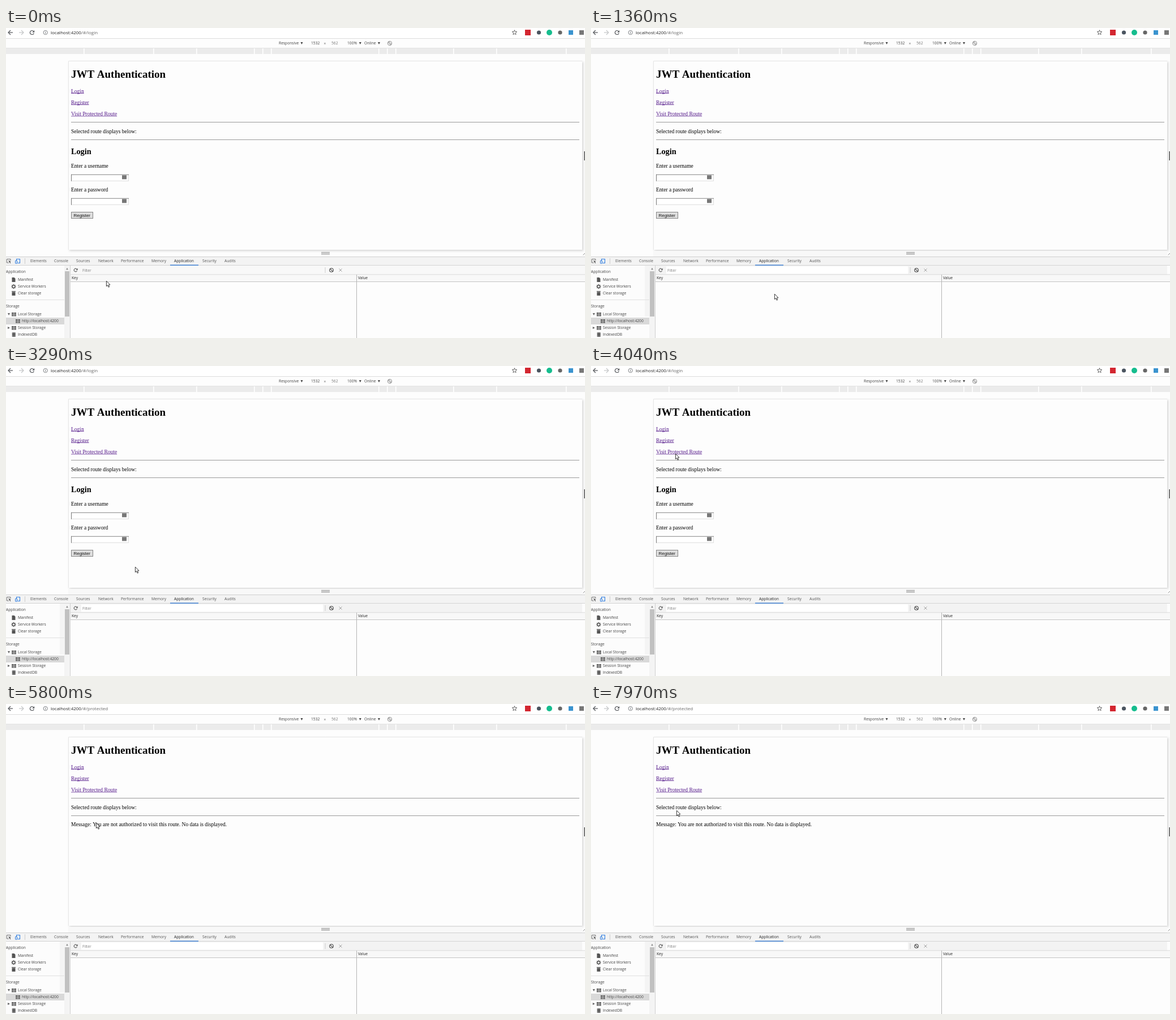
Animation of 1023x548 px, one loop 8000 ms. Source, as an HTML page with a canvas:

```html
<!DOCTYPE html>
<html lang="en">
<head>
<meta charset="utf-8">
<title>JWT Authentication</title>
<style>
html, body { margin: 0; width: 100%; height: 100%; overflow: hidden; background: #fdfdfd; }
canvas { display: block; width: 1023px; height: 548px; }
</style>
</head>
<body>
<canvas id="stage"></canvas>
<script>
const W = 1023, H = 548, LOOP = 8000, STEP = 120;
const canvas = document.getElementById('stage');
const ratio = window.devicePixelRatio || 1;
canvas.width = W * ratio;
canvas.height = H * ratio;
const ctx = canvas.getContext('2d');

const UI = '"Open Sans", "Noto Sans", sans-serif';
const SERIF = '"Liberation Serif", "Times New Roman", serif';
const ARIAL = '"Liberation Sans", Arial, sans-serif';
const UI_SIZE = 6.7;
const BODY = 9.49;

// start time, x and y of the pointer tip, number of even steps to get there
const MOVES = [
  [0, 177, 447], [280, 192, 438, 2], [550, 157, 405], [700, 123, 400],
  [820, 96, 428], [970, 219, 498, 3], [1360, 324, 470], [1480, 328, 442],
  [1630, 248, 410], [1750, 164, 425], [1900, 135, 462], [2020, 153, 492],
  [2170, 243, 505], [2320, 284, 486], [3020, 256, 423, 2], [3290, 228, 355],
  [3410, 210, 308, 2], [3680, 149, 155, 4], [4190, 147, 153], [4890, 165, 233, 2],
  [5160, 166, 235], [5410, 160, 211, 3], [5800, 159, 210], [6080, 254, 213, 4],
  [6590, 384, 213, 3], [6960, 391, 213], [7080, 225, 212, 3], [7460, 152, 211, 4],
  [7970, 151, 188]
];

function pointerAt(t) {
  const i = MOVES.filter(m => m[0] <= t).length - 1;
  const [start, x, y, steps = 1] = MOVES[i];
  const [, fromX, fromY] = MOVES[Math.max(0, i - 1)];
  const k = Math.min(1, (Math.floor((t - start) / STEP) + 1) / steps);
  return [Math.round(fromX + (x - fromX) * k), Math.round(fromY + (y - fromY) * k)];
}

function rect(x, y, w, h, color) {
  ctx.fillStyle = color;
  ctx.fillRect(x, y, w, h);
}

function line(points, color, width = 1, closed = false) {
  ctx.beginPath();
  points.forEach(([x, y], i) => i ? ctx.lineTo(x, y) : ctx.moveTo(x, y));
  if (closed) ctx.closePath();
  ctx.strokeStyle = color;
  ctx.lineWidth = width;
  ctx.stroke();
}

function shape(points, color) {
  ctx.beginPath();
  points.forEach(([x, y]) => ctx.lineTo(x, y));
  ctx.closePath();
  ctx.fillStyle = color;
  ctx.fill();
}

function dot(x, y, r, color) {
  ctx.beginPath();
  ctx.arc(x, y, r, 0, Math.PI * 2);
  ctx.fillStyle = color;
  ctx.fill();
}

function ring(x, y, r, color, width = 1, from = 0, to = Math.PI * 2) {
  ctx.beginPath();
  ctx.arc(x, y, r, from, to);
  ctx.strokeStyle = color;
  ctx.lineWidth = width;
  ctx.stroke();
}

function text(str, x, y, size, family, color = '#000', weight = '') {
  ctx.font = `${weight} ${size}px ${family}`;
  ctx.fillStyle = color;
  ctx.fillText(str, x, y);
  return ctx.measureText(str).width;
}

// label placed by the middle of its line
function label(str, x, mid, color = '#444', size = UI_SIZE) {
  return text(str, x, mid + size * 0.36, size, UI, color);
}

function serif(str, y, color = '#000') {
  return text(str, 115, y, BODY, SERIF, color);
}

function link(str, y, color = '#551a8b') {
  const w = serif(str, y, color);
  rect(115, y + 0.8, w, 0.7, color);
}

function triangle(x, y, r, color, dir) {
  shape(dir === 'right'
    ? [[x - r, y - r], [x + r, y], [x - r, y + r]]
    : [[x - r, y - r * dir], [x + r, y - r * dir], [x, y + r * dir]], color);
}

function reload(x, y, r, color, width) {
  ring(x, y, r, color, width, 0.35, 5.5);
  shape([[x + r + 0.7, y - r - 0.4], [x + r + 0.7, y - 0.3], [x + 0.4, y - 0.3]], color);
}

function arrow(x, y, dir, color) {
  line([[x - 4 * dir, y], [x + 4 * dir, y]], color, 1.2);
  line([[x, y - 4], [x + 4 * dir, y], [x, y + 4]], color, 1.2);
}

function star(x, y, r) {
  const pts = [];
  for (let i = 0; i < 10; i++) {
    const a = -Math.PI / 2 + i * Math.PI / 5, k = i % 2 ? r * 0.45 : r;
    pts.push([x + k * Math.cos(a), y + k * Math.sin(a)]);
  }
  line(pts, '#555', 0.9, true);
}

function addressBar(path) {
  rect(0, 0, W, 18, '#fff');
  arrow(8, 8, -1, '#505357');
  arrow(27, 8, 1, '#c3c5c7');
  reload(46, 8, 3.5, '#505357', 1.2);
  ring(69.7, 8, 3.6, '#5f6368', 0.8);
  rect(69.3, 7.3, 0.9, 2.7, '#5f6368');
  rect(69.3, 5.7, 0.9, 0.9, '#5f6368');
  const w = label('localhost:4200', 79, 8, '#222', 8);
  label(path, 79 + w, 8, '#666', 8);
  star(898.5, 8, 4.4);
  rect(917, 3, 10, 10, '#d32630');
  dot(941.5, 8, 3.6, '#4b5560');
  dot(960, 8, 5, '#16bd8e');
  dot(979, 8, 3.6, '#666');
  rect(994, 4, 8, 8, '#3a93cf');
  rect(1013, 4, 8, 8, '#777');
  rect(0, 18, W, 1, '#dcdcdc');
}

function deviceBar() {
  rect(0, 19, W, 17, '#fdfdfd');
  label('Responsive', 482, 27);
  triangle(522.5, 27, 2, '#444', 1);
  label('1532', 539, 27);
  label('×', 561.5, 28, '#666');
  label('562', 575, 27, '#777');
  label('100%', 603, 27);
  triangle(625.8, 27, 2, '#444', 1);
  label('Online', 633, 27);
  triangle(659, 27, 2, '#444', 1);
  ring(678, 27, 3.7, '#777', 0.8);
  line([[675.6, 25.5], [677, 24.4], [680.4, 28.4], [679, 29.6]], '#666', 0.8, true);
  rect(0, 35, W, 1, '#e3e3e3');
  rect(0, 36, W, 10, '#ebebeb');
  // breakpoint marks mirror around the centre
  for (const d of [95, 110, 125, 227, 303, 426]) {
    for (const x of [564 - d, 564 + d]) rect(x - 1, 36, 1.6, 10, '#fff');
  }
}

function input(y) {
  rect(115, y, 102, 12, '#dedede');
  rect(115, y, 102, 1, '#777');
  rect(115, y, 1, 12, '#777');
  rect(116, y + 1, 100, 10, '#fff');
  rect(205, y + 1.5, 8, 7, '#777');
}

function loginForm() {
  text('Login', 115, 223, 14.23, SERIF, '#000', 'bold');
  serif('Enter a username', 246.8);
  input(258.8);
  serif('Enter a password', 288.8);
  input(300.8);
  rect(115, 325, 39, 12, '#858585');
  rect(116, 326, 37, 10, '#dedede');
  text('Register', 119.6, 333.8, 7.9, ARIAL, '#111');
}

function page(t) {
  ctx.save();
  ctx.shadowColor = 'rgba(0,0,0,0.16)';
  ctx.shadowBlur = 4 * ratio;
  ctx.shadowOffsetX = ctx.shadowOffsetY = 1.5 * ratio;
  rect(110, 58, 908, 334, '#fdfdfd');
  ctx.restore();
  line([[110.5, 392], [110.5, 58.5], [1018, 58.5]], '#e6e6e6');

  text('JWT Authentication', 115, 88.4, 18.98, SERIF, '#000', 'bold');
  link('Login', 114.5);
  link('Register', 134.6);
  const pressed = t >= 4590 && t < 4740;
  if (pressed) rect(115, 146, 81, 11, '#add8e6');
  link('Visit Protected Route', 154.8, pressed ? '#b0507e' : undefined);
  rect(115, 166, 898, 1, '#9a9a9a');
  serif('Selected route displays below:', 185.6);
  rect(115, 197, 898, 1, '#9a9a9a');
  if (t < 4590) loginForm();
  else serif('Message: You are not authorized to visit this route. No data is displayed.', 216.3);
}

function resizers(t) {
  if (isResizing(t)) rect(110, 392, 908, 12, '#d5d5d5');
  else if (t >= 820) rect(110, 394, 908, 10, '#f8f8f8');
  rect(557, 396.3, 15, 1, '#777');
  rect(557, 399, 15, 1, '#777');
  rect(1021.5, 218, 1.5, 16, '#555');
  line([[1019.5, 401.5], [1023, 398]], '#777', 0.8);
}

function tabs() {
  rect(0, 404, W, 16, '#f3f3f3');
  rect(0, 404, W, 1, '#d0d0d0');
  line([[5, 415], [1.5, 415], [1.5, 408.5], [8, 408.5], [8, 411]], '#666', 0.9);
  shape([[4, 410.5], [9, 412.8], [6.9, 413.5], [8.5, 415.5], [7.5, 416], [6, 414.2]], '#555');
  line([[18.5, 408.5], [24.5, 408.5], [24.5, 415.5], [18.5, 415.5]], '#2f7de1', 1.1, true);
  rect(16, 411, 4.5, 6, '#f3f3f3');
  line([[16.6, 411.5], [19.6, 411.5], [19.6, 416], [16.6, 416]], '#2f7de1', 1, true);
  rect(33, 407, 1, 10, '#ccc');
  const names = { Elements: 43, Console: 85, Sources: 124, Network: 163, Performance: 203,
    Memory: 257, Application: 297, Security: 347, Audits: 386 };
  for (const name in names) label(name, names[name], 412, name === 'Application' ? '#222' : '#555');
  rect(0, 419, W, 1, '#d4d4d4');
  rect(290, 418.5, 50, 1.5, '#3f7fd0');
}

function grid(x, y) {
  rect(x, y - 3, 8, 6.4, '#555');
  for (const dy of [-1.2, 0.9]) rect(x, y + dy, 8, 0.6, '#eee');
  rect(x + 3.7, y - 3, 0.6, 6.4, '#eee');
}

function gear(x, y) {
  ring(x, y, 2.4, '#555', 1.5);
  for (let i = 0; i < 8; i++) {
    const a = i * Math.PI / 4, c = Math.cos(a), s = Math.sin(a);
    line([[x + 3 * c, y + 3 * s], [x + 4.2 * c, y + 4.2 * s]], '#555', 1.1);
  }
}

function sidebar(t) {
  rect(0, 420, 113, 128, '#fcfcfc');
  if (t >= 820) rect(95, 420, 18, 90, '#f4f4f4');
  label('Application', 0, 431);
  shape([[10.5, 441], [14.5, 441], [16.5, 443], [16.5, 449], [10.5, 449]], '#555');
  label('Manifest', 21, 445);
  gear(13.5, 457);
  label('Service Workers', 21, 457);
  rect(10.5, 466.5, 6, 6.5, '#555');
  rect(10, 465, 7, 1, '#555');
  label('Clear storage', 21, 469);
  rect(0, 480, 103, 1, '#e0e0e0');
  label('Storage', 0, 492);
  triangle(5, 506, 2, '#666', 1);
  grid(10, 506);
  label('Local Storage', 21, 506);
  rect(0, 512, 103, 12, '#d9d9d9');
  grid(17, 518);
  label('http://localhost:4200', 28, 518);
  triangle(5, 530, 2, '#666', 'right');
  grid(10, 530);
  label('Session Storage', 21, 530);
  for (const y of [539.5, 542, 544.5]) {
    ctx.beginPath();
    ctx.ellipse(13.8, y, 3.4, 1.3, 0, 0, Math.PI * 2);
    ctx.fillStyle = '#555';
    ctx.fill();
  }
  label('IndexedDB', 21, 542);
  rect(103, 420, 10, 128, '#f4f4f4');
  triangle(108, 425.5, 1.8, '#888', -1);
  rect(104, 430, 8, 80, '#c1c1c1');
  rect(113, 420, 1, 128, '#cfcfcf');
}

function storageTable(t) {
  rect(114, 420, W - 114, 128, '#fdfdfd');
  if (t >= 820) {
    rect(114, 420, 904, 16, '#f3f3f3');
    rect(133, 421.5, 427, 13, '#fff');
  } else {
    rect(114, 420, 909, 16, '#f8f8f8');
    if (t >= 550) rect(156, 420, 43, 16, '#f3f3f3');
  }
  reload(123, 428, 2.9, '#444', 1);
  label('Filter', 135, 428.5, '#808080');
  rect(563.5, 423, 1, 10, '#ccc');
  ring(575, 428, 3.3, '#444', 1.1);
  line([[572.8, 425.8], [577.2, 430.2]], '#444', 1.1);
  line([[588.4, 425.4], [593.6, 430.6]], '#999', 0.9);
  line([[593.6, 425.4], [588.4, 430.6]], '#999', 0.9);
  rect(114, 435.5, W - 114, 1, '#cfcfcf');
  rect(114, 436.5, W - 114, 11.5, '#f8f8f8');
  label('Key', 116, 442, '#222');
  label('Value', 622, 442, '#222');
  rect(114, 448, W - 114, 1, '#c4c4c4');
  rect(619, 436, 1, 112, '#b4b4b4');
}

function pointer(x, y) {
  const pts = [[0, 0], [0, 9.4], [2.1, 7.4], [3.7, 11], [5.3, 10.3], [3.7, 6.9], [6.6, 6.7]]
    .map(([dx, dy]) => [x + 0.4 + dx, y + 0.2 + dy]);
  shape(pts, '#fff');
  line(pts, '#222', 0.9, true);
}

function resizePointer(x, y) {
  const half = [[0, -6], [3, -2.6], [1, -2.6], [1, -0.9], [3, -0.9]];
  const right = half.concat(half.map(([dx, dy]) => [dx, -dy]).reverse());
  const pts = right.concat(right.map(([dx, dy]) => [-dx, dy]).reverse())
    .map(([dx, dy]) => [x + 0.5 + dx, y + 0.5 + dy]);
  line(pts, '#222', 1.2, true);
  shape(pts, '#fff');
  rect(x - 2, y, 5, 0.9, '#222');
}

function isResizing(t) {
  return t >= 700 && t < 820;
}

function draw(t) {
  ctx.setTransform(ratio, 0, 0, ratio, 0, 0);
  rect(0, 0, W, H, '#fdfdfd');
  addressBar(t < 4590 ? '/#/login' : '/#/protected');
  deviceBar();
  page(t);
  resizers(t);
  tabs();
  sidebar(t);
  storageTable(t);
  (isResizing(t) ? resizePointer : pointer)(...pointerAt(t));
}

const begin = performance.now();
function tick() {
  draw((performance.now() - begin) % LOOP);
  requestAnimationFrame(tick);
}
tick();
</script>
</body>
</html>
```
